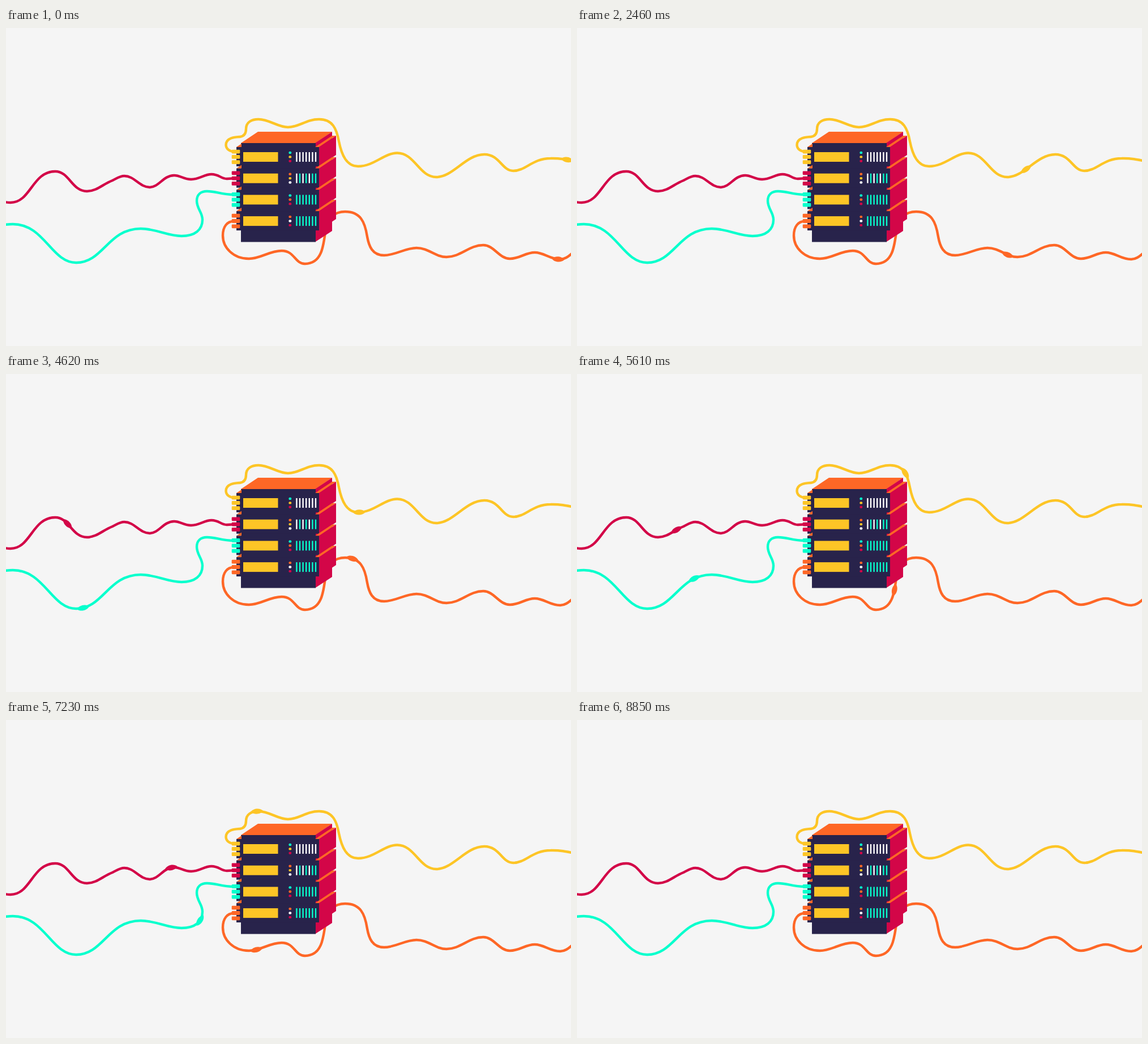
Write an HTML page that moves like this. It is 998 px wide and 561 px high and loops after 9 s.

```html
<!DOCTYPE html>
<html lang="en">
<head>
<meta charset="utf-8">
<title>Server with data cables</title>
<style>
  html, body { margin: 0; width: 100%; height: 100%; overflow: hidden; background: #f5f5f5; }
  svg { display: block; width: 100%; height: 100%; }
  .cable { fill: none; stroke-width: 4.4; }
</style>
</head>
<body>
<svg viewBox="0 0 998 561">
  <g id="cables"></g>
  <g id="server"></g>
</svg>
<script>
const LOOP = 9000, STEP = 30, PITCH = 37.7;
const navy = '#28234b', yellow = '#fdc526', red = '#d30648',
      teal = '#08ffcd', orange = '#fe6726', white = '#ffffff';

// Each cable: colour, route, and stops [time, x, y] its pulse passes.
const cables = [
  { color: yellow,
    d: `M1010 236C990 232 978 229.5 962 230C930 230 918 252 896 252C876 252 872 223 845 223
        C812 223 790 263 760 263C730 263 722 220.5 691 220.5C668 220.5 650 244 622 244
        C602 244 593 225 588 200C584 178 577 161 553 161C530 161 518 175 498 175
        C480 175 465 161 446 161C434 161 424 166 424 178C424 186 421 191 413 192
        C405 192.5 389 193 388.5 206C388.5 214 396 218 403 218H425`,
    stops: [[0, 991, 235], [2460, 793, 249], [4620, 624, 244], [7920, 400, 194]] },
  { color: orange,
    d: `M1012 390C1000 394 993 408 979 408C960 408 951 396 934 396C917 396 908 407 890 407
        C871 407 862 383 843 383C818 383 803 404 778 404C758 404 747 388 725 388
        C705 388 688 401 668 401C647 401 641 385 638 368C634 342 626 324 599 324
        C580 324 567 336 565 352C561 385 558 416 528 416C510 416 510 393 487 393
        C465 393 450 407 429 407C402 407 383 388 383 366C383 350 391 341 402 341H425`,
    stops: [[0, 975, 408], [2460, 761, 399], [4620, 612, 325], [7920, 387, 384]] },
  { color: red,
    d: `M-12 305C-4 307 2 308 8 308C44 308 46 253 87 253C112 253 116 288 143 288
        C160 288 172 275 188 269C196 265 201 261 209 261C227 261 236 281 254 281
        C270 281 278 260 297 260C308 260 314 267 327 267C342 267 350 258 363 258
        C376 258 380 266 390 266L425 264`,
    stops: [[3510, 39, 291], [4620, 109, 264], [6540, 242, 279], [7920, 346, 262]] },
  { color: teal,
    d: `M-12 348C-4 347 4 346 12 346C68 346 80 414 124 414C172 414 180 354 238 354
        C265 354 285 367 310 367C334 367 347 356 347 338C347 325 337 319 337 305
        C337 294 344 288 355 288C372 288 380 294 403 294H425`,
    stops: [[3510, 60, 365], [4620, 136, 412], [6540, 288, 363], [7920, 338, 297]] }
];

const units = [
  { ports: yellow, dots: [teal, yellow, red], bars: 'wwwwwww' },
  { ports: red, dots: [orange, yellow, white], bars: 'wtwtwtt' },
  { ports: teal, dots: [teal, orange, red], bars: 'ttttttt' },
  { ports: orange, dots: [orange, white, red], bars: 'ttttttt' }
];

const rect = (x, y, w, h, fill, r = 0) =>
  `<rect x="${x}" y="${y}" width="${w}" height="${h}" rx="${r}" fill="${fill}"/>`;
const poly = (points, fill) => `<polygon points="${points}" fill="${fill}"/>`;

function drawUnit({ ports, dots, bars }, row) {
  const y = 210 + row * PITCH;
  return poly(`407,${y} 416,${y - 6} 416,${y}`, orange) +
    poly(`546,${y} 576,${y - 20} 583,${y - 20} 553,${y}`, orange) +
    poly(`553,${y} 583,${y - 20} 583,${y + 14} 553,${y + 34}`, red) +
    rect(407, y, 146, 34, navy) +
    rect(419, y + 9, 61.5, 17, yellow) +
    dots.map((c, i) =>
      `<ellipse cx="501.8" cy="${y + 10 + i * 7.4}" rx="2.5" ry="2.2" fill="${c}"/>`).join('') +
    [...bars].map((b, i) =>
      rect(512.2 + i * 5.6, y + 9, 2.4, 17, b === 'w' ? white : teal)).join('') +
    [0, 1, 2].map(i => rect(398.7, y + 4.7 + i * 9.3, 14.6, 6.8, ports, 1.4)).join('');
}

document.getElementById('server').innerHTML =
  poly('445,183 576,183 547,203 415,203', orange) +
  poly('546,203 576,183 576,358 546,377.5', red) +
  rect(415, 203, 132, 174.5, navy) +
  units.map(drawUnit).join('');

document.getElementById('cables').innerHTML = cables.map(({ color, d }) =>
  `<path class="cable" stroke="${color}" d="${d}"/>` +
  `<path class="pulse" fill="${color}" d="M-11 0C-6 -6.2 6 -6.2 11 0C6 6.2 -6 6.2 -11 0Z"/>`).join('');

function nearestLength(path, x, y) {
  let best = 0, least = Infinity;
  for (let s = 0; s < path.getTotalLength(); s += 0.5) {
    const p = path.getPointAtLength(s);
    const gap = Math.hypot(p.x - x, p.y - y);
    if (gap < least) { least = gap; best = s; }
  }
  return best;
}

const lines = document.querySelectorAll('.cable');
const pulses = document.querySelectorAll('.pulse');
cables.forEach((cable, i) => {
  cable.path = lines[i];
  cable.pulse = pulses[i];
  cable.keys = cable.stops.map(([t, x, y]) => [t, nearestLength(lines[i], x, y)]);
});

// Linear between stops, carried on at the same speed past both ends.
function lengthAt(keys, t) {
  let i = 1;
  while (i < keys.length - 1 && t > keys[i][0]) i++;
  const [t0, s0] = keys[i - 1], [t1, s1] = keys[i];
  return s0 + (s1 - s0) * (t - t0) / (t1 - t0);
}

function placePulse({ path, pulse, keys }, t) {
  const total = path.getTotalLength();
  const s = Math.max(0, Math.min(total, lengthAt(keys, t)));
  const p = path.getPointAtLength(s);
  const a = path.getPointAtLength(Math.max(0, s - 5));
  const b = path.getPointAtLength(Math.min(total, s + 5));
  const angle = Math.atan2(b.y - a.y, b.x - a.x) * 180 / Math.PI;
  pulse.setAttribute('transform', `translate(${p.x} ${p.y}) rotate(${angle})`);
}

const start = performance.now();
function render() {
  const elapsed = (performance.now() - start) % LOOP;
  const t = Math.min(Math.floor(elapsed / STEP) * STEP, 8850);
  cables.forEach(cable => placePulse(cable, t));
  requestAnimationFrame(render);
}
render();
</script>
</body>
</html>
```
